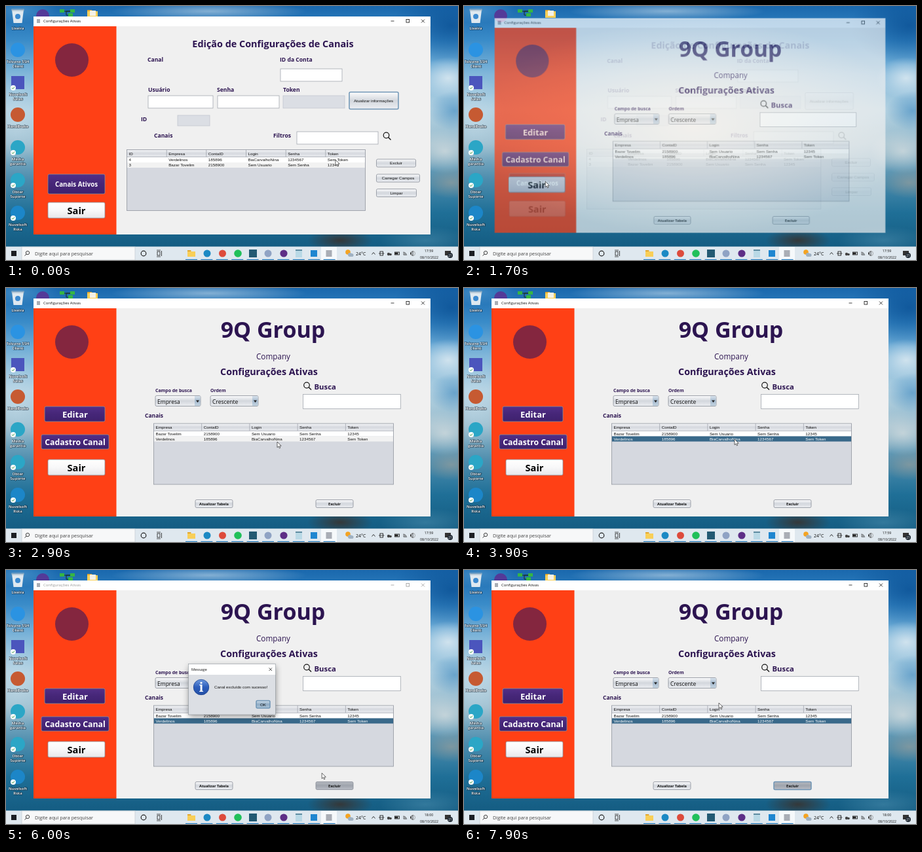
These frames come from a looping animation (690x388 px, 8000 ms). An HTML page with a canvas:

```html
<!DOCTYPE html>
<html lang="pt-BR">
<head>
<meta charset="utf-8">
<title>Configurações Ativas</title>
<style>
html, body { margin: 0; width: 100%; height: 100%; overflow: hidden; background: #3c8cc8; }
canvas { display: block; width: 100vw; height: 100vh; }
</style>
</head>
<body>
<canvas id="stage"></canvas>
<script>
const W = 690, H = 388, LOOP = 8000, STEP = 100;
const UI = '"Open Sans", "Noto Sans", sans-serif';
const SANS = '"Liberation Sans", Arial, sans-serif';
const INK = '#2c1450', RED = '#ff4015', SELECT = '#39698a';
const PLAIN = ['#fcfcfd', '#d3d7dd', '#eceef2'];
const PRESSED = ['#b4b8bf', '#9fa4ad', '#b9bdc5'];
const WHITE = ['#ffffff', '#f8f8f9', '#e6e7ea'];
const PURPLE = ['#523088', '#462678', '#3e216e'];
const DARK = ['#32174f', '#2a1145', '#2a1145'];

const dpr = window.devicePixelRatio || 1;
const stage = document.getElementById('stage');
const layer = document.createElement('canvas');
const desk = document.createElement('canvas');
for (const c of [stage, layer, desk]) { c.width = W * dpr; c.height = H * dpr; }
let g;

const clamp = v => Math.max(0, Math.min(1, v));
const ease = p => p * p * (3 - 2 * p);

function use(canvas) {
  g = canvas.getContext('2d');
  g.setTransform(dpr, 0, 0, dpr, 0, 0);
}
function rect(x, y, w, h, fill) {
  g.fillStyle = fill;
  g.fillRect(x, y, w, h);
}
function disc(x, y, r, fill) {
  g.fillStyle = fill;
  g.beginPath();
  g.arc(x, y, r, 0, 7);
  g.fill();
}
function ring(x, y, r, color, width = 1) {
  g.strokeStyle = color;
  g.lineWidth = width;
  g.beginPath();
  g.arc(x, y, r, 0, 7);
  g.stroke();
}
function line(points, color, width = 1) {
  g.strokeStyle = color;
  g.lineWidth = width;
  g.beginPath();
  points.forEach(([x, y]) => g.lineTo(x, y));
  g.stroke();
}
function frame(x, y, w, h, color, width = 1) {
  g.strokeStyle = color;
  g.lineWidth = width;
  g.strokeRect(x, y, w, h);
}
function blend(x0, y0, x1, y1, colors) {
  const grad = g.createLinearGradient(x0, y0, x1, y1);
  colors.forEach((c, i) => grad.addColorStop(i / (colors.length - 1), c));
  return grad;
}
function glow(x, y, rx, ry, rgb, alpha) {
  g.save();
  g.translate(x, y);
  g.scale(rx, ry);
  const grad = g.createRadialGradient(0, 0, 0, 0, 0, 1);
  grad.addColorStop(0, `rgba(${rgb},${alpha})`);
  grad.addColorStop(1, `rgba(${rgb},0)`);
  rect(-1, -1, 2, 2, grad);
  g.restore();
}
function text(s, x, y, size, { color = '#111', font = UI, weight = 400, align = 'left' } = {}) {
  g.font = `${weight} ${size}px ${font}`;
  g.fillStyle = color;
  g.textAlign = align;
  g.fillText(s, x, y);
}
const bold = (s, x, y, size, align, color = INK) => text(s, x, y, size, { weight: 700, align, color });
const plain = (s, x, y, color = '#111', align) => text(s, x, y, 6.25, { font: SANS, color, align });

function button(x, y, w, h, colors, focus) {
  g.beginPath();
  g.roundRect(x, y, w, h, 2);
  g.fillStyle = blend(0, y, 0, y + h, colors);
  g.fill();
  g.strokeStyle = focus ? '#6f95b5' : '#898e98';
  g.lineWidth = focus ? 1.5 : 0.8;
  g.stroke();
}
function field(x, y, w, h, off) {
  rect(x, y, w, h, off ? '#dbdee4' : '#fff');
  frame(x, y, w, h, off ? '#c2c6cf' : '#a4a8b0', 0.8);
}
function lens(x, y) {
  ring(x, y, 4.3, '#151515', 1.2);
  line([[x + 3, y + 3], [x + 7, y + 7]], '#151515', 1.4);
}
function combo(x, y, w, label) {
  button(x, y, w, 16, PLAIN);
  rect(x + w - 9, y + 0.5, 8.5, 15, blend(0, y, 0, y + 16, ['#dce6ef', '#a5bace', '#c5d5e2']));
  g.fillStyle = '#222';
  g.beginPath();
  g.moveTo(x + w - 7, y + 7);
  g.lineTo(x + w - 2, y + 7);
  g.lineTo(x + w - 4.5, y + 10.5);
  g.fill();
  text(label, x + 3, y + 12, 8.5);
}
function table(x, y, w, h, cols, rows, selected) {
  const cw = w / cols.length;
  rect(x, y, w, h, '#d5d8df');
  rect(x, y, w, 11, blend(0, y, 0, y + 11, ['#f5f6f8', '#d6d9df', '#e9ebef']));
  rows.forEach((row, r) => {
    const on = r === selected, top = y + 11.5 + r * 8;
    rect(x, top, w, 8, on ? SELECT : r ? '#f2f2f2' : '#fff');
    row.forEach((s, c) => plain(s, x + 3 + c * cw, top + 6.4, on ? '#fff' : '#111'));
  });
  cols.forEach((s, c) => {
    plain(s, x + 3 + c * cw, y + 8);
    if (c) rect(x + c * cw - 0.4, y, 0.8, 11, '#a3a7af');
  });
  rect(x, y + 10.8, w, 0.7, '#a3a7af');
  frame(x, y, w, h, '#9a9ea7', 0.9);
}

function wallpaper() {
  rect(0, 0, W, H, blend(0, 0, 0, 368, ['#1a68ad', '#3a8cc9', '#83b8da', '#aacde0', '#94b9cc', '#4f8eae', '#1f6f97', '#145c82']));
  glow(350, 185, 330, 165, '246,240,228', 1);
  glow(20, 6, 60, 20, '96,168,218', 0.5);
  glow(310, 8, 150, 14, '214,230,240', 0.55);
  glow(15, 175, 50, 70, '214,230,238', 0.5);
  glow(680, 30, 90, 60, '10,80,148', 0.8);
  glow(675, 110, 45, 32, '232,240,244', 0.75);
  glow(685, 160, 40, 30, '62,136,190', 0.6);
  glow(670, 222, 50, 34, '228,230,228', 0.65);
  glow(680, 270, 44, 24, '176,164,150', 0.5);
  glow(510, 358, 50, 18, '60,46,38', 0.8);
  glow(640, 358, 70, 22, '80,146,178', 0.5);
}
function shortcut(y, color, labels, badge = true, square = false) {
  if (square) rect(8, y - 10, 20, 20, color);
  else disc(18, y, 11, color);
  if (badge) {
    disc(11, y + 8, 4, '#fff');
    line([[9, y + 8], [10.5, y + 9.6], [13, y + 6.5]], '#3c9a4a', 1);
  }
  caption(labels, y + 19.5);
}
function caption(labels, y) {
  g.lineJoin = 'round';
  g.strokeStyle = 'rgba(15,30,45,.6)';
  g.lineWidth = 1.3;
  labels.forEach((s, i) => {
    g.font = `600 6px ${UI}`;
    g.textAlign = 'center';
    g.strokeText(s, 18.4, y + i * 7.2 + 0.4);
    text(s, 18, y + i * 7.2, 6, { color: '#fff', align: 'center', weight: 600 });
  });
  g.lineJoin = 'miter';
}
function folder(x, y, w, h) {
  rect(x, y, w * 0.45, 4, '#e3a72f');
  rect(x, y + 2, w, h - 2, '#f8cf58');
}
function icons() {
  g.fillStyle = 'rgba(232,238,242,.95)';
  g.beginPath();
  [[9, 6], [27, 6], [24.5, 26], [11.5, 26]].forEach(p => g.lineTo(...p));
  g.fill();
  frame(9, 5, 18, 2, '#9db2c2', 1);
  disc(18, 16, 4, '#3c8ad0');
  caption(['Lixeira'], 36);
  shortcut(67, '#2b93e2', ['Tolvane SSH', 'Client'], false);
  shortcut(117, '#4b55bd', ['Nuvelsoft', 'Salas'], true, true);
  shortcut(166, '#c65a32', ['HandBrake'], false);
  shortcut(216, '#2ba6c6', ['Minha', 'garantia']);
  shortcut(266, '#2ba6c6', ['Obter', 'Suporte']);
  shortcut(316, '#1c86c8', ['Nuvelsoft', 'Rota'], true);
  disc(56, 15, 10, '#533a98');
  line([[86, 8], [103, 8], [92, 8], [92, 14], [99, 14]], '#1b2b20', 1);
  [[82, 5], [98, 5], [95, 11]].forEach(([x, y]) => rect(x, y, 7, 5, '#35b545'));
  folder(124, 6, 16, 12);
  rect(128, 7, 9, 8, '#f4f1e6');
}
function taskbar() {
  rect(0, 367.5, W, 21, '#dfe8ef');
  rect(24, 368, 173, 20, '#f7f8f9');
  frame(24, 368, 173, 20, '#c3cbd2', 0.7);
  rect(8, 374, 8, 8, '#1c1f24');
  ring(33, 377, 2.7, '#333', 0.9);
  line([[31, 379], [28.5, 381.7]], '#333', 0.9);
  text('Digite aqui para pesquisar', 44, 381, 7.3, { color: '#444' });
  ring(210, 378, 3.8, '#222', 1.2);
  frame(231, 375, 4, 6, '#333', 0.9);
  line([[237.5, 374], [237.5, 382]], '#333', 0.9);
  line([[230, 373], [236, 373]], '#333', 0.8);
  line([[230, 383], [236, 383]], '#333', 0.8);

  rect(481, 368, 24, 20, '#f6f9fb');
  folder(277, 373, 12, 10);
  disc(307, 378, 5.5, '#1b89c4');
  disc(330.5, 378, 5.5, '#dd4b3c');
  disc(354, 378, 5.8, '#20c05a');
  rect(371, 372, 12, 12, '#235a73');
  disc(400, 378, 5.5, '#8fa3c4');
  disc(424, 378, 5.6, '#5d2e86');
  rect(442, 372, 10, 12, '#b9d9e6');
  rect(442, 372, 10, 2, '#5e8ba0');
  rect(465, 373, 10, 10, '#1f86d0');
  rect(488.5, 373, 9, 10, '#a9adb5');
  for (let i = 0; i < 10; i++) rect(274 + i * 23.4, 386.8, 18, 1.2, '#2d83c4');

  disc(522, 376, 3.8, '#f4a321');
  disc(525, 380, 3, '#9fb1c2');
  disc(528, 380.5, 2.5, '#9fb1c2');
  text('24°C', 534, 381, 7);
  line([[558.5, 379.5], [561, 376.5], [563.5, 379.5]], '#222', 0.9);
  frame(571, 375, 4.5, 6, '#222', 0.9);
  line([[569, 378], [577.5, 378]], '#222', 0.8);
  disc(584, 379, 2.2, '#444');
  disc(587, 379.5, 1.8, '#444');
  frame(593.5, 376, 7, 4, '#222', 0.9);
  rect(594, 376.5, 4.5, 3, '#222');
  for (let r = 1.5; r < 6; r += 1.7) {
    g.beginPath();
    g.arc(606.5, 381, r, -1.6, 0);
    g.strokeStyle = '#222';
    g.lineWidth = 0.8;
    g.stroke();
  }
  rect(617, 376.5, 2, 3, '#222');
  line([[619, 376.5], [621, 374.5], [621, 381.5], [619, 379.5]], '#222', 0.8);
  ring(621, 378, 3.5, '#777', 0.6);
  text('08/10/2022', 646, 386, 5.3, { align: 'center' });
  rect(670, 374, 9, 7, '#333');
  disc(678, 381, 4, '#202a34');
  text('21', 678, 383, 4.6, { color: '#fff', align: 'center' });
}

function chrome(active) {
  rect(42, 16, 606, 333, '#f0f0f0');
  rect(42, 16, 606, 15, '#fff');
  rect(42, 31, 126.5, 318, RED);
  const tone = active ? '#111' : '#999';
  rect(47, 20, 5, 6, '#a9adb5');
  text('Configurações Ativas', 57, 25.2, 5.9, { color: tone });
  line([[587.5, 23], [592.5, 23]], tone, 0.8);
  frame(611, 20.5, 4.6, 4.6, tone, 0.8);
  line([[634, 20.5], [639, 25.5]], tone, 0.8);
  line([[639, 20.5], [634, 25.5]], tone, 0.8);
  disc(100.5, 82.5, 25.5, '#84263f');
}

const CREDS = {
  a: ['Verdelinos', '185896', 'BiaCarvalhoNina', '1234567', 'Sem Token'],
  b: ['Bazar Tovelim', '2158900', 'Sem Usuario', 'Sem Senha', '12345']
};
const COLS = ['Empresa', 'ContaID', 'Login', 'Senha', 'Token'];

function editPage(t) {
  const pressed = t >= 1300;
  chrome(t < 1600);
  button(64, 257, 87, 30, pressed ? DARK : PURPLE, pressed);
  bold('Canais Ativos', 107.5, 276, 9.75, 'center', '#fff');
  button(64, 300, 87, 24, WHITE);
  bold('Sair', 107.5, 318, 14.6, 'center', '#000');

  bold('Edição de Configurações de Canais', 407.5, 63, 14.4, 'center');
  [['Canal', 216, 85], ['ID da Conta', 418, 85], ['Usuário', 217, 131], ['Senha', 322, 131],
   ['Token', 423, 131], ['ID', 206, 176], ['Canais', 226, 201], ['Filtros', 408, 201]]
    .forEach(([s, x, y]) => bold(s, x, y, 8.6));
  field(419, 96, 94, 19);
  field(217, 137, 99, 19);
  field(323, 137, 94, 19);
  field(423, 137, 94, 19, true);
  field(262, 167, 49, 16, true);
  field(444, 192, 124, 19);
  lens(580.5, 197.5);
  button(524, 131.5, 75, 26, PLAIN, !pressed);
  plain('Atualizar informações', 561, 147, '#111', 'center');
  table(184.5, 219.5, 364, 93, ['ID', ...COLS], [['4', ...CREDS.a], ['3', ...CREDS.b]]);
  [['Excluir', 234, 60], ['Carregar Campos', 257, 66], ['Limpar', 279.5, 61]].forEach(([s, y, w]) => {
    button(565.5, y, w, 12, PLAIN);
    plain(s, 565.5 + w / 2, y + 8.4, '#111', 'center');
  });
}

function listPage(t) {
  const modal = t >= 5700 && t < 7000;
  chrome(!modal);
  button(59, 181, 92, 23, PURPLE);
  bold('Editar', 105.5, 198.3, 13, 'center', '#fff');
  button(54, 224, 103, 22, PURPLE);
  bold('Cadastro Canal', 105.5, 240.3, 12.3, 'center', '#fff');
  button(64, 262, 87, 24, WHITE);
  bold('Sair', 107.5, 280, 14.6, 'center', '#000');

  bold('9Q Group', 407.5, 76, 34, 'center');
  text('Company', 408, 108.5, 11.7, { color: INK, align: 'center' });
  bold('Configurações Ativas', 401.5, 133, 14.25, 'center');
  lens(459, 148.5);
  bold('Busca', 470.5, 155, 11.3);
  field(453.5, 162.5, 149, 22);
  bold('Campo de busca', 228, 158.5, 6.9);
  bold('Ordem', 312, 158.5, 6.9);
  combo(228, 164.5, 69, 'Empresa');
  combo(312, 164.5, 73, 'Crescente');
  bold('Canais', 212, 198, 8.5);
  table(225.5, 207, 366, 93, COLS, [CREDS.b, CREDS.a], t >= 3500 ? 1 : -1);
  button(289, 323.5, 57, 12, PLAIN);
  bold('Atualizar Tabela', 317.5, 331.5, 5.6, 'center', '#111');
  const hit = t >= 5500;
  button(473, 323.5, 57, 12, hit ? PRESSED : PLAIN, hit && !modal);
  bold('Excluir', 501.5, 331.5, 5.6, 'center', '#111');
}

function dialog() {
  g.shadowColor = 'rgba(0,0,0,.45)';
  g.shadowBlur = 9 * dpr;
  g.shadowOffsetY = 3 * dpr;
  rect(278.5, 143.5, 133, 77.5, '#dcdfe4');
  g.shadowColor = 'transparent';
  g.shadowBlur = g.shadowOffsetY = 0;
  rect(278.5, 143.5, 133, 16.5, '#fff');
  frame(278.5, 143.5, 133, 77.5, '#8d949c', 0.6);
  text('Message', 283, 154, 5.8);
  line([[401.5, 149.5], [406, 154]], '#222', 0.8);
  line([[406, 149.5], [401.5, 154]], '#222', 0.8);
  disc(298, 179, 12, blend(0, 167, 0, 191, ['#6f9be0', '#2c5dbb', '#2450a6']));
  ring(298, 179, 11.7, '#26478c', 0.7);
  text('i', 298, 186, 19, { font: '"Noto Serif", serif', weight: 700, color: '#fff', align: 'center' });
  plain('Canal excluído com sucesso!', 318, 181);
  button(382, 199.5, 21, 11.5, ['#cfdfec', '#8fabc4', '#adc6da'], true);
  plain('OK', 392.5, 207.6, '#111', 'center');
}

// paints off-screen first, so overlapping parts fade as one
function show(paint, alpha, scale) {
  if (alpha <= 0) return;
  const cx = 345, cy = 182;
  use(layer);
  g.clearRect(0, 0, W, H);
  paint();
  use(stage);
  g.globalAlpha = alpha;
  g.translate(cx, cy);
  g.scale(scale, scale);
  g.drawImage(layer, -cx, -cy, W, H);
  use(stage);
  g.globalAlpha = 1;
}

// time, x, y of the pointer tip
const PATH = [
  [0, 503, 235], [600, 412, 248], [700, 412, 248], [1100, 125, 268], [1900, 124, 268],
  [2800, 414, 235], [3100, 414, 235], [3400, 413, 231], [4100, 413, 231], [5000, 464, 329],
  [5300, 497, 329], [5800, 497, 329], [6600, 402, 208], [7200, 402, 208], [7900, 389, 203], [8000, 389, 203]
];
function pointer(t) {
  const i = PATH.findIndex(p => p[0] > t);
  const [t0, x0, y0] = PATH[i - 1], [t1, x1, y1] = PATH[i];
  const p = ease((t - t0) / (t1 - t0));
  g.save();
  g.translate(x0 + (x1 - x0) * p, y0 + (y1 - y0) * p);
  g.beginPath();
  [[0, 0], [0, 8.6], [2, 6.8], [3.4, 9.8], [4.8, 9.1], [3.5, 6.3], [6.2, 6.1]].forEach(q => g.lineTo(...q));
  g.closePath();
  g.fillStyle = '#fff';
  g.fill();
  g.strokeStyle = '#2a2a2a';
  g.lineWidth = 0.7;
  g.stroke();
  g.restore();
}

function draw(t) {
  use(stage);
  g.drawImage(desk, 0, 0, W, H);
  const q = clamp((t - 1600) / 220), grow = 1 - (1 - q) ** 2;
  show(() => editPage(t), clamp(1 - q * 1.5), 1 - q * 0.04);
  show(() => listPage(t), grow ** 0.1 * q ** 0.7, 0.95 + 0.05 * grow);
  const open = clamp((t - 5600) / 220), shut = clamp((t - 6900) / 180);
  show(dialog, open * (1 - shut), 0.96 + 0.04 * open - 0.03 * shut);
  text(t < 6000 ? '17:59' : '18:00', 645.5, 376, 5.3, { align: 'center' });
  pointer(t);
}

use(desk);
wallpaper();
icons();
taskbar();

const start = performance.now();
function tick() {
  const t = (performance.now() - start) % LOOP;
  draw(Math.floor(t / STEP) * STEP);
  requestAnimationFrame(tick);
}
tick();
</script>
</body>
</html>
```
